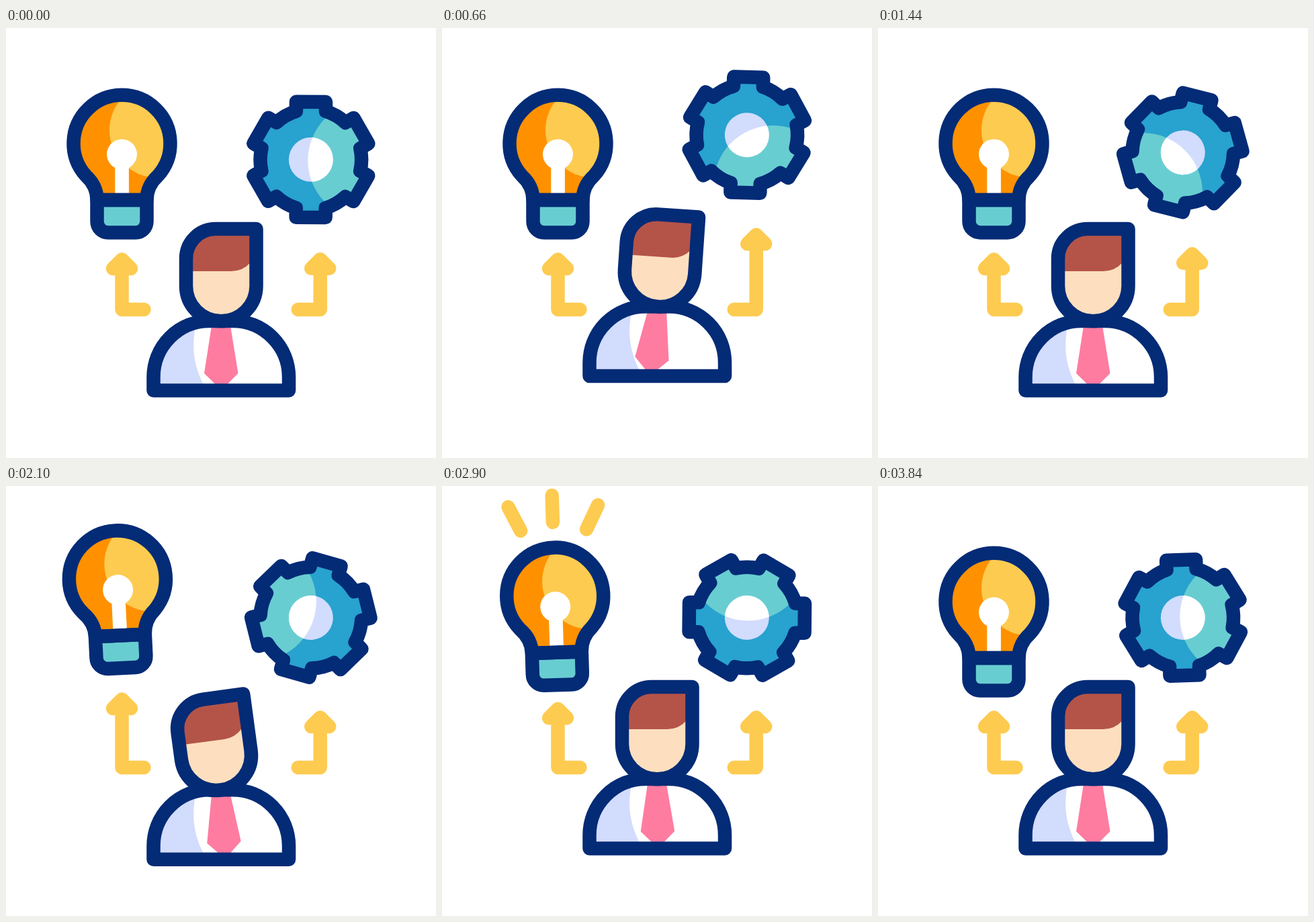
An HTML page with a canvas for the animation above (3860 ms loop, 640 by 640 pixels).

```html
<!DOCTYPE html>
<html lang="en">
<head>
<meta charset="utf-8">
<title>Ideas and process</title>
<style>
html, body { margin: 0; width: 100%; height: 100%; overflow: hidden; background: #fff; }
canvas { display: block; width: 100%; height: 100%; object-fit: contain; }
</style>
</head>
<body>
<canvas id="stage" width="640" height="640"></canvas>
<script>
const ctx = document.getElementById('stage').getContext('2d');
const LOOP = 3860, RAD = Math.PI / 180, LINE = 20.5;
const NAVY = '#042b76', ORANGE = '#ff9100', YELLOW = '#fdcb50', TEAL = '#68cdd1',
  BLUE = '#28a2ce', LILAC = '#d2dcfd', BROWN = '#b45449', SKIN = '#fddfbf', PINK = '#fe7ca0';

// Keys are [time, value] pairs, eased between neighbours.
const BODY_Y = [[0, 0], [365, 16.5], [715, -24], [1100, 0], [1730, 0], [2085, 16.5], [2435, -24], [2780, 0]];
const HEAD_TILT = [[0, 0], [355, -7.7], [715, 4.7], [1110, 0], [1730, 0], [2090, -7.7], [2500, 5.2], [2860, 0]];
const TIE_TILT = [[0, 0], [350, -4], [700, 7], [1000, -3], [1250, 0], [1740, 0], [2085, -3.6], [2435, 6], [2735, -2], [3000, 0]];
const BULB_TILT = [[1960, 0], [2280, -6.7], [2680, 6.5], [3020, -5], [3350, 0]];

const ease = (t, a, b) => {
  const u = Math.min(1, Math.max(0, (t - a) / (b - a)));
  return u * u * (3 - 2 * u);
};

function track(keys, t) {
  let v = keys[0][1];
  for (let i = 1; i < keys.length; i++) {
    v += (keys[i][1] - keys[i - 1][1]) * ease(t, keys[i - 1][0], keys[i][0]);
  }
  return v;
}

// Soft rise to a peak and back.
const lift = (t, peak, height, up, down) => {
  const d = (t - peak) / (t < peak ? up : down);
  return -height * Math.exp(-d * d / 2);
};

function group(draw) {
  ctx.save();
  draw();
  ctx.restore();
}

function turn(deg, x, y) {
  ctx.translate(x, y);
  ctx.rotate(deg * RAD);
  ctx.translate(-x, -y);
}

function fill(path, color) {
  ctx.fillStyle = color;
  ctx.fill(path);
}

function stroke(path, color = NAVY) {
  ctx.strokeStyle = color;
  ctx.stroke(path);
}

function disc(x, y, r) {
  const p = new Path2D();
  p.arc(x, y, r, 0, 2 * Math.PI);
  return p;
}

const glass = new Path2D('M135.5 256C135.5 243 130 230 119 220A72 72 0 1 1 226 220C215 230 209.5 243 209.5 256Z');
const socket = new Path2D('M135.5 256V288A16.5 16.5 0 0 0 152 304.5H193A16.5 16.5 0 0 0 209.5 288V256Z');
const head = new Path2D('M372.5 299H312A44 44 0 0 0 268 343V384A52.25 52.25 0 0 0 372.5 384Z');
const hair = new Path2D('M262 290H380V330L363 350Q352 362 335 362H262Z');
const torso = new Path2D('M219.5 539.5V519.5A83.5 83.5 0 0 1 303 436H337.5A83.5 83.5 0 0 1 421 519.5V539.5Z');
const shade = new Path2D('M210 430H286Q269 483 294 531V545H210Z');
const tie = new Path2D('M306.5 440H333.5L345.5 514L320.5 539L295 514Z');

const cog = new Path2D();
for (let i = 0; i < 6; i++) {
  const r = 75.3, half = Math.asin(22 / r), a = (i * 60 - 90) * RAD;
  const point = (x, y) => cog.lineTo(
    x * Math.cos(a) - y * Math.sin(a), x * Math.sin(a) + y * Math.cos(a));
  point(r * Math.cos(half), -22);
  point(86, -22);
  point(86, 22);
  cog.arc(0, 0, r, a + half, a + Math.PI / 3 - half);
}
cog.closePath();

function drawGear(t) {
  group(() => {
    ctx.translate(453.8, 196 + lift(t, 920, 60, 262, 280));
    ctx.rotate(2 * Math.PI * t / LOOP);
    const light = disc(84.5, 1, 89), hub = disc(0, 0, 33);
    fill(cog, BLUE);
    group(() => {
      ctx.clip(cog);
      fill(light, TEAL);
    });
    fill(hub, LILAC);
    group(() => {
      ctx.clip(hub);
      fill(light, '#fff');
    });
    stroke(cog);
  });
}

function drawSparks(t) {
  if (t < 2585 || t > 3130) return;
  const inner = 109 + 40 * ease(t, 2880, 3130);
  const outer = 109.8 + 40 * ease(t, 2580, 2880);
  for (const deg of [-26, 0, 27]) {
    const x = Math.sin(deg * RAD), y = -Math.cos(deg * RAD);
    const ray = new Path2D();
    ray.moveTo(172.5 + inner * x, 172 + inner * y);
    ray.lineTo(172.5 + outer * x, 172 + outer * y);
    stroke(ray, YELLOW);
  }
}

function drawBulb(t) {
  group(() => {
    ctx.translate(0, lift(t, 2378, 58, 265, 265));
    turn(track(BULB_TILT, t), 172.5, 310);
    drawSparks(t);
    fill(glass, ORANGE);
    group(() => {
      ctx.clip(glass);
      fill(disc(224.5, 152, 70.5), YELLOW);
    });
    fill(disc(172.5, 188, 22.5), '#fff');
    ctx.fillRect(162.3, 188, 20.6, 66);
    fill(socket, TEAL);
    stroke(glass);
    stroke(socket);
  });
}

// side is 1 when the foot points right, -1 when it points left
function drawArrow(x, side, dy) {
  const shaft = new Path2D();
  shaft.moveTo(x + side * 33, 419);
  shaft.lineTo(x, 419);
  shaft.lineTo(x, 356 + dy);
  stroke(shaft, YELLOW);
  const tip = new Path2D();
  tip.moveTo(x - 13.5, 358 + dy);
  tip.lineTo(x, 344.5 + dy);
  tip.lineTo(x + 13.5, 358 + dy);
  tip.closePath();
  fill(tip, YELLOW);
  stroke(tip, YELLOW);
}

function drawPerson(t) {
  group(() => {
    ctx.translate(0, track(BODY_Y, t));
    fill(torso, '#fff');
    group(() => {
      ctx.clip(torso);
      fill(shade, LILAC);
      turn(track(TIE_TILT, t), 320, 446);
      fill(tie, PINK);
    });
    stroke(torso);
    turn(track(HEAD_TILT, t), 320, 440);
    fill(head, SKIN);
    group(() => {
      ctx.clip(head);
      fill(hair, BROWN);
    });
    stroke(head);
  });
}

function draw(t) {
  ctx.fillStyle = '#fff';
  ctx.fillRect(0, 0, 640, 640);
  ctx.lineWidth = LINE;
  ctx.lineCap = ctx.lineJoin = 'round';
  drawArrow(172.5, 1, lift(t, 2435, 60, 265, 265));
  drawArrow(467.7, -1, lift(t, 920, 60, 262, 262));
  drawBulb(t);
  drawGear(t);
  drawPerson(t);
}

const start = performance.now();
function tick() {
  draw((performance.now() - start) % LOOP);
  requestAnimationFrame(tick);
}
tick();
</script>
</body>
</html>
```
